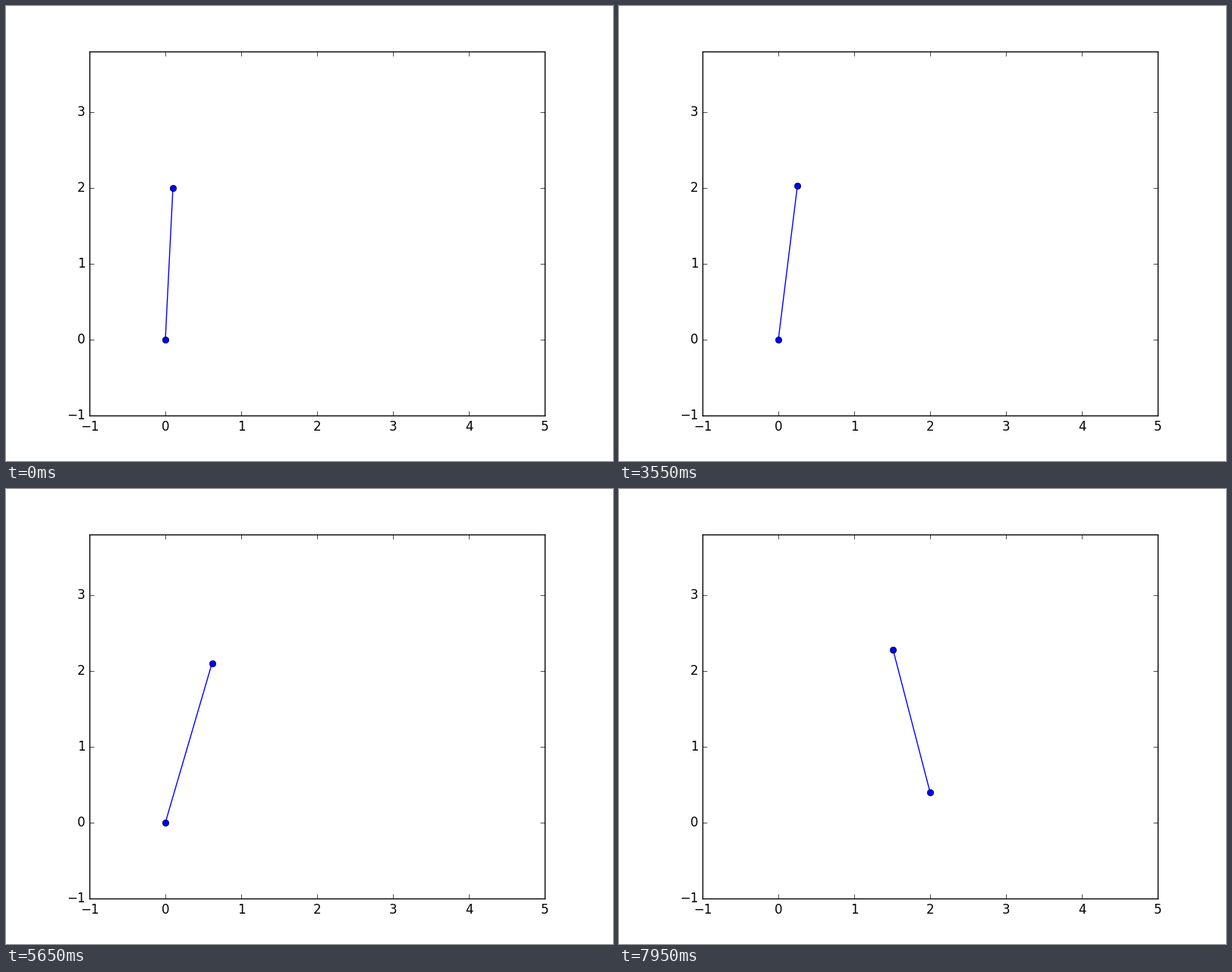
These frames come from a looping animation (800 by 600 pixels, 8000 ms). A matplotlib script:

```python
import math

import matplotlib.pyplot as plt
from matplotlib.animation import FuncAnimation

FRAMES = 160
INTERVAL = 50            # ms
RATE = 0.4431            # growth rate of the pendulum, per second
START_X = 0.1
SLOPE = 0.2
STEP_SHOWN = 6.95        # s, the new foothold appears
STEP_FELT = 6.99         # s, the new foothold starts to act
FEET = ((0.0, 0.0), (2.0, 0.4))

plt.style.use("classic")
plt.rcParams["font.family"] = "DejaVu Sans"


def swing(offset, speed, seconds):
    """Offset from the foot after some time; speed is in units of RATE."""
    phase = RATE * seconds
    return offset * math.cosh(phase) + speed * math.sinh(phase)


def body(t):
    """Body position on its sloped path at time t."""
    if t <= STEP_FELT:
        x = swing(START_X, 0, t)
    else:
        foot_x = FEET[1][0]
        offset = swing(START_X, 0, STEP_FELT) - foot_x
        speed = START_X * math.sinh(RATE * STEP_FELT)
        x = foot_x + swing(offset, speed, t - STEP_FELT)
    return x, 2 + SLOPE * (x - START_X)


fig = plt.figure(figsize=(8, 6), dpi=100, facecolor="white")
ax = fig.add_axes([0.1375, 0.1, 0.75, 0.8])
ax.set_xlim(-1, 5)
ax.set_ylim(-1, 3.8)
ax.set_xticks(range(-1, 6))
ax.set_yticks(range(-1, 4))
leg, = ax.plot([], [], "bo-", lw=1, markersize=6,
               markeredgecolor="black", markeredgewidth=0.5)


def update(frame):
    t = frame * INTERVAL / 1000
    foot = FEET[t >= STEP_SHOWN]
    leg.set_data(*zip(foot, body(t)))
    return leg,


anim = FuncAnimation(fig, update, frames=FRAMES, interval=INTERVAL,
                     repeat=True, repeat_delay=0)
plt.show()
```
